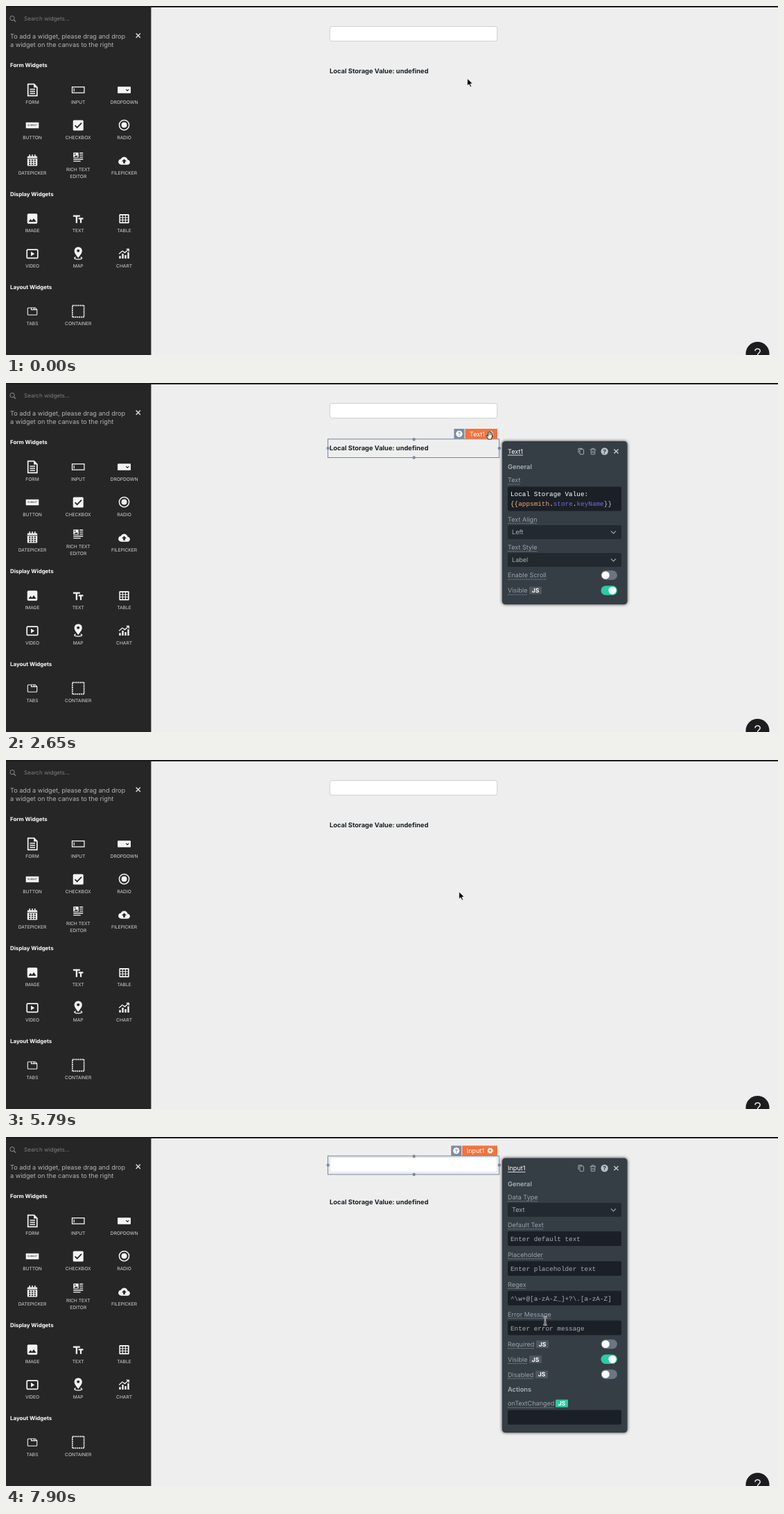
An HTML page for the animation above (8000 ms loop, 1114x503 px).

```html
<!DOCTYPE html>
<html lang="en">
<head>
<meta charset="utf-8">
<title>Widget editor</title>
<style>
html, body { margin: 0; width: 100%; height: 100%; overflow: hidden; background: #eee; }
svg { display: block; width: 1114px; height: 503px; }
text { font-family: Inter, sans-serif; white-space: pre; text-rendering: geometricPrecision; }
.mono { font-family: "Liberation Mono", monospace; }
</style>
</head>
<body>
<svg id="stage" viewBox="0 0 1114 503" xmlns="http://www.w3.org/2000/svg"></svg>
<script>
const LOOP = 8000;
const SIDE = '#262626', ICON = '#f4f4f4', ORANGE = '#f3733d', SLATE = '#7b8ca3';
const BODY = 9.1, CODE = 9.36;
const stage = document.getElementById('stage');

// y is the middle of the capitals
const text = (x, y, s, size, fill, attrs = '') =>
  `<text x="${x}" y="${y + size * 0.364}" font-size="${size}" fill="${fill}" ${attrs}>${s}</text>`;
const rect = (x, y, w, h, fill, attrs = '') =>
  `<rect x="${x}" y="${y}" width="${w}" height="${h}" fill="${fill}" ${attrs}/>`;
const line = (d, stroke, width, attrs = '') =>
  `<path d="${d}" fill="none" stroke="${stroke}" stroke-width="${width}" ${attrs}/>`;
const shape = (d, fill, attrs = '') => `<path d="${d}" fill="${fill}" ${attrs}/>`;
const disc = (x, y, r, fill, attrs = '') => `<circle cx="${x}" cy="${y}" r="${r}" fill="${fill}" ${attrs}/>`;
const group = (id, body) => `<g id="${id}">${body}</g>`;
const move = (x, y, scale = 1) => `transform="translate(${x} ${y}) scale(${scale})"`;
const cells = (x, y, dx, dy, w, h, rows, cols) => Array.from({ length: rows * cols }, (_, i) =>
  rect(x + (i % cols) * dx, y + Math.floor(i / cols) * dy, w, h, SIDE)).join('');
const cross = (x, y, r, color, width) =>
  line(`M${x - r} ${y - r}l${2 * r} ${2 * r}m0 ${-2 * r}l${-2 * r} ${2 * r}`, color, width);
const help = (x, y, r, fill, mark) => disc(x, y, r, fill) +
  text(x, y, '?', r * 1.65, mark, 'text-anchor="middle" font-weight="700"');

// Sidebar icons, each drawn around its own centre
const icons = {
  form: line('M-6.3 -8.3H2.5L6.8 -4V8.3H-6.3Z', ICON, 1.7) + shape('M2 -9V-3.4H7.5Z', ICON) +
    line('M-3.6 -1H4M-3.6 2H4M-3.6 5H4', ICON, 1.5),
  input: rect(-8.7, -4.3, 17.4, 8.4, 'none', `stroke="${ICON}" stroke-width="1.3"`) + line('M-6 -2.2V2.2', ICON, 1.2),
  dropdown: rect(-9.5, -4.7, 19, 9.4, ICON, 'rx="1"') + line('M2.7 -.9L4.7 1.1L6.7 -.9', SIDE, 1.2),
  button: rect(-9.3, -4.3, 18.6, 8.6, ICON, 'rx=".6"') +
    text(0, 0, 'SUBMIT', 3.6, '#555', 'text-anchor="middle" font-weight="600"'),
  checkbox: rect(-7.5, -7.5, 15, 15, ICON, 'rx="1.6"') + line('M-4.6 .2L-1.6 3.2L4.8 -3.3', SIDE, 1.8),
  radio: disc(0, -.4, 7.1, 'none', `stroke="${ICON}" stroke-width="1.5"`) + disc(0, -.4, 4, ICON),
  date: rect(-7.2, -5.8, 14.4, 14, ICON, 'rx="1.2"') + line('M-3.8 -8.2V-4M0 -8.2V-4M3.8 -8.2V-4', ICON, 1.5) +
    line('M-7 -2.6H7', SIDE, .9) + cells(-5, -.9, 3.8, 3, 2.3, 1.8, 3, 3),
  rich: rect(-7, -6.5, 7.5, 7.5, ICON, 'rx=".5"') + disc(-4.6, -4.2, 1, SIDE) +
    shape('M-6 0L-3.9 -2.5L-2.8 -1.5L-1.7 -2.8L-.5 0Z', SIDE) +
    line('M2 -5.7H7M2 -2.8H7M2 .2H7M-7 3H7M-7 5.9H3.5', ICON, 1.4),
  file: shape('M19.35 10.04C18.67 6.59 15.64 4 12 4 9.11 4 6.6 5.64 5.35 8.04 2.34 8.36 0 10.91 0 14c0 3.31 2.69 6 6 6h13c2.76 0 5-2.24 5-5 0-2.64-2.05-4.78-4.65-4.96zM14 13v4h-4v-4H7l5-5 5 5h-3z', ICON, move(-8.4, -7, .7)),
  image: rect(-7.3, -7.3, 14.6, 14.6, ICON, 'rx="1.7"') + shape('M-5.5 4.4L-2.6 .6L-.5 3.1L2 -.5L5.6 4.4Z', SIDE),
  text: shape('M-7.3 -5.6H2.6V-3.3H-1.2V5.8H-3.5V-3.3H-7.3ZM.4 -1.8H7.2V.5H4.9V5.8H2.7V.5H.4Z', ICON),
  table: rect(-7.2, -6.5, 14.4, 13.2, ICON, 'rx="1.2"') + cells(-5.7, -4.6, 4.1, 3.5, 3, 2.5, 3, 3),
  video: rect(-7.8, -6, 15.6, 12.2, 'none', `rx="1.2" stroke="${ICON}" stroke-width="1.7"`) + shape('M-2 -3.2L3.2 .1L-2 3.4Z', ICON),
  map: shape('M0 6.5C-2 3.4 -5.6 .4 -5.6 -3.8A5.6 5.6 0 0 1 5.6 -3.8C5.6 .4 2 3.4 0 6.5Z', ICON) +
    disc(0, -3.8, 2, SIDE) + line('M-3.5 5.2C-8 7 -4 8.5 0 8.5S8 7 3.5 5.2', ICON, 1.3),
  chart: line('M-6 7V3.2M-2 7V0M2 7V2M6 7V-2', ICON, 2.4) +
    line('M-7.4 .2L-2.6 -4L1 -1.4L6.5 -6.4M3.2 -6.7H6.8V-3', ICON, 1.3),
  tabs: line('M-6.7 4.2V-4Q-6.7 -5 -5.7 -5H4.2L6.7 -2.6V4.2Q6.7 5.2 5.7 5.2H-5.7Q-6.7 5.2 -6.7 4.2ZM-1.5 -5V-2.4H6.5M2.5 -5V-2.4', ICON, 1.1),
  container: rect(-8.4, -8.4, 16.8, 16.8, 'none', `stroke="${ICON}" stroke-width="1.7" stroke-dasharray="2 .8"`)
};

const columns = [38, 104.2, 170.5];
const card = (name, col, iconY, labelY, ...lines) => `<g ${move(columns[col], iconY)}>${icons[name]}</g>` +
  lines.map((s, i) => text(columns[col], labelY + i * 10.6, s, 6.65, '#d6d6d6', 'text-anchor="middle"')).join('');
const heading = (y, s) => text(6, y, s, 7.88, '#fff', 'font-weight="700"');

const sidebar = rect(0, 0, 209.4, 503, SIDE) + rect(0, 0, 1114, 2, '#1d1c1e') +
  disc(9, 17.6, 3.2, 'none', 'stroke="#8c8c8c" stroke-width="1"') + line('M11.3 20L14 22.7', '#8c8c8c', 1.2) +
  text(26, 18.5, 'Search widgets...', 8.05, '#7d7d7d') +
  text(6, 43.5, 'To add a widget, please drag and drop', 9.15, '#b4b4b4') +
  text(6, 56, 'a widget on the canvas to the right', 9.15, '#b4b4b4') +
  cross(190.7, 42.7, 3.1, '#e0e0e0', 1.4) +
  heading(85.5, 'Form Widgets') +
  card('form', 0, 121, 139, 'FORM') + card('input', 1, 121, 139, 'INPUT') + card('dropdown', 2, 121, 139, 'DROPDOWN') +
  card('button', 0, 172, 189.7, 'BUTTON') + card('checkbox', 1, 172, 189.7, 'CHECKBOX') + card('radio', 2, 172, 189.7, 'RADIO') +
  card('date', 0, 222.3, 240.5, 'DATEPICKER') + card('rich', 1, 217.7, 235.2, 'RICH TEXT', 'EDITOR') + card('file', 2, 221.8, 240.5, 'FILEPICKER') +
  heading(271, 'Display Widgets') +
  card('image', 0, 306.5, 324, 'IMAGE') + card('text', 1, 307, 324, 'TEXT') + card('table', 2, 306.5, 324, 'TABLE') +
  card('video', 0, 357.2, 375, 'VIDEO') + card('map', 1, 356.6, 375, 'MAP') + card('chart', 2, 357, 375, 'CHART') +
  heading(405.3, 'Layout Widgets') +
  card('tabs', 0, 440, 458, 'TABS') + card('container', 1, 440, 458, 'CONTAINER');

const canvas = rect(467.3, 29.5, 241.5, 21.2, '#fff', 'id="field" rx="3" stroke="#cfcfcf"') +
  text(467, 93.8, 'Local Storage Value: undefined', 9.36, '#182026', 'font-weight="700"') +
  disc(1084.5, 501, 17, '#1d1c1e') +
  line('M1081 497.2C1081 492.8 1088.4 492.9 1088.2 497.3C1088 500.3 1084.6 500 1084.6 503', '#e8e8e8', 1.6);

const gear = (x, y) => disc(x, y, 2.4, 'none', 'stroke="#fff" stroke-width="2"') +
  disc(x, y, 3.6, 'none', 'stroke="#fff" stroke-width="1.3" stroke-dasharray="1.6 1.23"');

// Outline with handles and the name tag in its three looks
function frame(id, name, top, tagX) {
  const mid = top + 13.5, tagY = top - 14.5, nameX = tagX + 6.5;
  const tag = (look, fill, ink, extra = '') => group(`${id}-${look}`, rect(tagX, tagY, 709 - tagX, 14.5, fill) +
    text(nameX, tagY + 7.2, name, BODY, ink) + extra);
  const helpTag = rect(tagX - 16, tagY, 15, 14.5, SLATE) + help(tagX - 8.5, tagY + 7.3, 4.6, '#fff', SLATE);
  return group(id, rect(464.5, top + .3, 247.2, 26.7, 'none', 'stroke="#74869b"') +
    [[588.7, top + .7], [588.7, top + 27], [464.7, mid], [711.8, mid]].map(p => disc(...p, 2.2, SLATE)).join('') +
    tag('hover', '#fbdccf', '#2a2a2a') +
    tag('focus', '#3a4149', '#fff', helpTag) +
    tag('active', ORANGE, '#fff', helpTag + gear(698.7, tagY + 7.2)));
}

// Property panel pieces
const LABEL = '#9aa3ad', INSET = '#1b2026';
const label = (y, s) => text(724, y, s, BODY, LABEL, `class="dotted" data-y="${y + 6}"`);
const section = (y, s) => text(724, y, s, 9.25, '#a9b2bb', 'font-weight="600"');
const code = (x, y, s, fill = '#a5acb3') => text(x, y, s, CODE, fill, 'class="mono"');
const select = (y, s) => rect(724, y, 164, 20, '#222a2f', 'rx="2"') + text(730, y + 10, s, BODY, '#a5aeb6') +
  line(`M873 ${y + 8.4}l3.5 3.5l3.5 -3.5`, '#9aa3ad', 1.3);
const inset = (y, s = '') => rect(724, y, 164, 21, INSET, 'rx="2"') + code(728, y + 10.7, s);
const toggle = (y, on) => rect(858.5, y - 6.7, 23.5, 13.4, on ? '#29cca3' : '#6b7584', 'rx="6.7"') +
  disc(on ? 875 : 865.2, y, 5.6, '#fff');
const js = (x, y, fill = '#50575f') => rect(x, y - 5.5, 18, 11, fill, 'rx="1"') +
  text(x + 9, y, 'JS', 8.6, '#fff', 'font-weight="700" text-anchor="middle"');

function panel(id, top, bottom, name, body) {
  const y = top + 14.5;
  return group(id, rect(716, top, 180.5, bottom - top, '#363d45', 'rx="4.5" filter="url(#shadow)"') +
    text(724, y, name, BODY, '#fff', `class="solid" data-y="${y + 5.5}"`) +
    rect(828, y - 3, 5.6, 7.3, 'none', 'rx=".8" stroke="#a5aeb6"') + line(`M826 ${y + 2}v-6.2h5.5`, '#a5aeb6', 1) +
    line(`M842.8 ${y - 2.6}h8.4M845.3 ${y - 2.6}v-1.6h3.4v1.6M844 ${y - 2.4}l.4 6.7h5.2l.4 -6.7M846 ${y - .5}v3M848 ${y - .5}v3`, '#a5aeb6', .9) +
    help(863.7, y, 5.2, '#b9c2ca', '#363d45') + cross(880.5, y, 3.1, '#c5ccd3', 1.4) +
    section(top + 37, 'General') + body);
}

const advance = CODE * 0.6;
const binding = [['{{', '#eacb92'], ['appsmith', '#f3a66b'], ['.', '#fff'], ['store', '#7a66d9'], ['.', '#fff'], ['keyName', '#7a66d9'], ['}}', '#b8bdd8']];
let col = 0;
const bindingText = binding.map(([s, fill]) => {
  const out = code(728 + col * advance, 174, s, fill);
  col += s.length;
  return out;
}).join('');

const textPanel = panel('textPanel', 84, 319, 'Text1',
  label(140, 'Text') + rect(724, 149.5, 164, 35, INSET, 'rx="2"') + code(728, 160, 'Local Storage Value:', '#fff') + bindingText +
  group('editorHover', rect(724.3, 149.3, 163.7, 35.2, 'none', 'rx="1" stroke="#fff"') + rect(867, 150, 20, 20, '#fff') +
    shape('M875.3 153H879.2L878.2 157H880.4L876 165.2L876.7 159.4H874.3Z', '#222')) +
  label(196.3, 'Text Align') + select(205, 'Left') + label(236.6, 'Text Style') + select(245, 'Label') +
  label(277, 'Enable Scroll') + toggle(277, false) + label(299, 'Visible') + js(755, 299) + toggle(299, true));

const inputPanel = panel('inputPanel', 30.5, 426, 'Input1',
  label(86.6, 'Data Type') + select(95, 'Text') +
  label(126.8, 'Default Text') + inset(136, 'Enter default text') +
  label(169.5, 'Placeholder') + inset(179, 'Enter placeholder text') +
  label(212.3, 'Regex') + inset(221.7, '^\\w+@[a-zA-Z_]+?\\.[a-zA-Z]') +
  label(255.2, 'Error Message') + inset(264.5, 'Enter error message') +
  label(298.7, 'Required') + js(765, 298.7) + toggle(298.5, false) +
  label(320.5, 'Visible') + js(755, 320.5) + toggle(320.3, true) +
  label(342.2, 'Disabled') + js(764, 342.2) + toggle(342, false) +
  section(364, 'Actions') + label(384, 'onTextChanged') + js(793, 384, '#29cca3') + inset(393.5));

const cursors =
  group('arrow', shape('M0 0V10.6L2.5 8.3L4.2 12.2L6 11.4L4.4 7.6H7.8Z', '#000', 'stroke="#fff" stroke-width=".8"')) +
  group('hand', shape('M-2.2 6L-4.6 1.6Q-4.7 .3 -3.4 .7L-2.4 1.9V-3.6Q-1.7 -5 -1 -3.7V-4.8Q-.2 -6 .6 -4.8V-4Q1.4 -5 2.1 -3.9V-2.7Q3 -3.5 3.6 -2.4V2L2.4 6Z', '#fff', 'stroke="#111" stroke-width=".9"') +
    line('M-1 -3.5V.2M.6 -4V.2M2.1 -3.2V.3', '#111', .6)) +
  group('beam', ['#fff', '#222'].map((c, i) =>
    line('M-2.6 -5.6Q0 -5.6 0 -4.2Q0 -5.6 2.6 -5.6M0 -4.4V4.4M-2.6 5.6Q0 5.6 0 4.2Q0 5.6 2.6 5.6M-1.6 1.8H1.6', c, i ? .9 : 2.2)).join(''));

stage.innerHTML = `<defs><filter id="shadow" x="-10%" y="-10%" width="120%" height="120%">
  <feDropShadow dx="0" dy="0" stdDeviation="2" flood-color="#000" flood-opacity=".85"/></filter></defs>` +
  rect(0, 0, 1114, 503, '#eee') + canvas + sidebar +
  frame('textFrame', 'Text1', 80.5, 662.5) + frame('inputFrame', 'Input1', 27, 658.3) +
  textPanel + inputPanel + cursors;

// Underlines follow the rendered width of their text
for (const el of stage.querySelectorAll('.dotted, .solid')) {
  const dotted = el.classList.contains('dotted');
  el.insertAdjacentHTML('afterend', line(`M724 ${el.dataset.y}h${el.getComputedTextLength()}`,
    dotted ? LABEL : '#fff', .8, dotted ? 'stroke-dasharray="1.5 1.1"' : ''));
}

// [time, x, y, cursor]; the pointer jumps from stop to stop
const pointer = [
  [0, 665.7, 104.5, 'arrow'], [150, 660, 112], [300, 645.5, 73],
  [600, 630, 47], [740, 608, 56], [890, 592, 76], [1040, 584, 90],
  [1310, 600, 92], [1460, 625, 90], [1610, 652, 86], [1760, 677, 80], [1910, 692, 76, 'hand'], [2050, 698, 75],
  [2950, 704, 84, 'arrow'], [3090, 724, 115], [3240, 750, 153, 'beam'], [3390, 768, 174], [3540, 764, 175], [3690, 758, 175],
  [3840, 742, 176], [3990, 760, 176], [4140, 795, 176], [4290, 832, 176], [4440, 850, 177], [4590, 846, 197, 'arrow'], [4740, 836, 191],
  [4890, 790, 190], [5040, 703, 191], [5190, 653.7, 190],
  [5940, 651, 150], [6090, 650, 100], [6240, 655, 47, 'beam'], [6390, 660, 41],
  [6720, 668, 38], [6870, 681, 33], [7010, 690, 23, 'hand'], [7160, 695, 20], [7460, 697.3, 20],
  [7750, 742, 130, 'arrow'], [7900, 778, 265, 'beam']
];
pointer.forEach((p, i) => p[3] ??= pointer[i - 1][3]);

const byId = Object.fromEntries([...stage.querySelectorAll('[id]')].map(el => [el.id, el]));
const show = (id, on) => byId[id].setAttribute('display', on ? 'inline' : 'none');

function draw(t) {
  const within = (from, to) => t >= from && t < to;
  show('textFrame', within(1310, 5790));
  show('textFrame-hover', t < 2650);
  show('textFrame-focus', false);
  show('textFrame-active', t >= 2650);
  show('textPanel', within(2650, 5790));
  show('editorHover', within(3240, 4590));
  show('inputFrame', t >= 6240);
  show('inputFrame-hover', t < 6720);
  show('inputFrame-focus', within(6720, 7610));
  show('inputFrame-active', t >= 7610);
  show('inputPanel', t >= 7610);
  byId.field.setAttribute('stroke', t >= 6720 ? '#dce4ef' : '#cfcfcf');

  const [, x, y, kind] = pointer.findLast(p => p[0] <= t);
  for (const id of ['arrow', 'hand', 'beam']) show(id, id === kind);
  byId[kind].setAttribute('transform', `translate(${x} ${y})`);
}

const start = performance.now();
function tick() {
  draw((performance.now() - start) % LOOP);
  requestAnimationFrame(tick);
}
tick();
</script>
</body>
</html>
```
